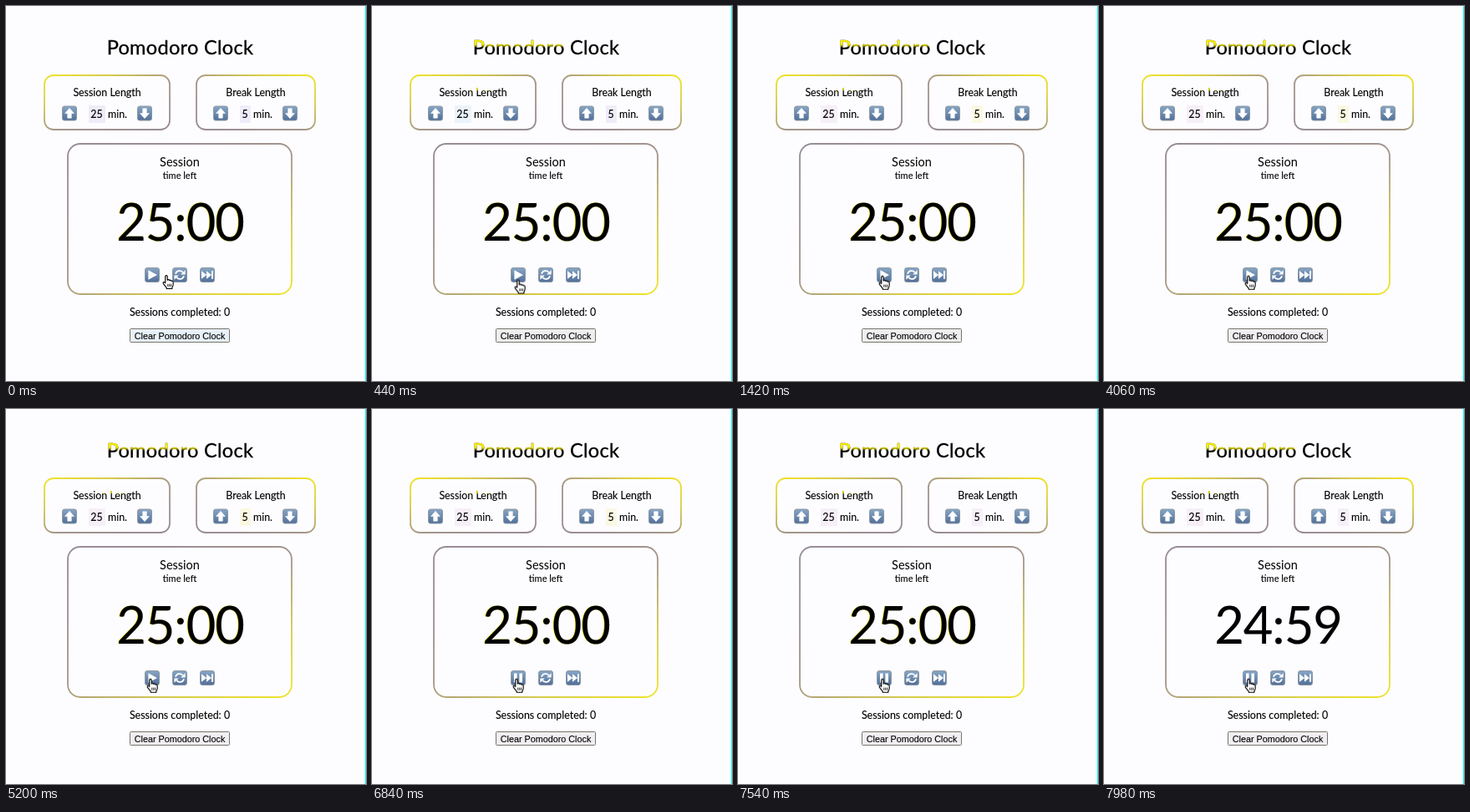
Recreate the animation shown at these times as an HTML page. Size 431x449 px, loop 8000 ms.

```html
<!DOCTYPE html>
<html lang="en">
<head>
<meta charset="utf-8">
<title>Pomodoro Clock</title>
<style>
  html, body { margin: 0; width: 100%; height: 100%; overflow: hidden; background: #fdfdff; }
  svg { display: block; width: 431px; height: 449px; }
  text { font-family: Lato, "Open Sans", sans-serif; font-size: 12.4px; text-anchor: middle; white-space: pre; }
  .ink { stroke: #000; stroke-width: .12; stroke-linejoin: round; }
  .title { font-size: 23.6px; letter-spacing: .28px; }
  .title.ink { stroke-width: .3; }
  .heading { font-size: 14.5px; }
  .small { font-size: 11px; }
  .timer { font-size: 61.5px; letter-spacing: -1.1px; }
  .btn { font: 10.8px "Liberation Sans", Arial, sans-serif; }
  .card { fill: none; stroke-width: 1.8; }
  .glyph { fill: #fff; }
  .arc { fill: none; stroke: #fff; stroke-width: 1.8; }

  .glow, .session, .break, .clear, .before-click, .after-click, .before-tick, .after-tick {
    animation: 8s step-end infinite;
  }
  .glow { animation-name: glow; }
  .session { animation-name: session; }
  .break { animation-name: break; }
  .clear { animation-name: clear; stroke: #77736a; }
  .before-click { animation-name: before-click; }
  .after-click { animation-name: after-click; }
  .before-tick { animation-name: before-tick; }
  .after-tick { animation-name: after-tick; }
  .hand { animation: hand 8s ease-in-out infinite; }

  @keyframes glow { 0% { opacity: 0; } 3%, 100% { opacity: 1; } }
  @keyframes session { 0% { fill: #f0ebf8; } 3% { fill: #ebf3fb; } 12%, 100% { fill: #f7eff8; } }
  @keyframes break { 0% { fill: #f0edfa; } 12% { fill: #fbf8e2; } 90%, 100% { fill: #f6eff8; } }
  @keyframes clear { 0% { fill: #e7f0f8; } 3% { fill: #eeeeef; } 50.75%, 100% { fill: #f1eef1; } }
  @keyframes before-click { 0% { opacity: 1; } 85.5%, 100% { opacity: 0; } }
  @keyframes after-click { 0% { opacity: 0; } 85.5%, 100% { opacity: 1; } }
  @keyframes before-tick { 0% { opacity: 1; } 98%, 100% { opacity: 0; } }
  @keyframes after-tick { 0% { opacity: 0; } 98%, 100% { opacity: 1; } }
  @keyframes hand {
    0%, .25% { transform: translate(187px, 322px); }
    5.5%, 6.75% { transform: translate(170px, 327.5px); }
    17.75%, 100% { transform: translate(168px, 322.7px); }
  }
</style>
</head>
<body>
<svg viewBox="0 0 431 449">
  <defs>
    <linearGradient id="edge" x1=".2" y1="0" x2="1" y2="1">
      <stop offset="0" stop-color="#988b98"/>
      <stop offset=".45" stop-color="#a4968a"/>
      <stop offset=".75" stop-color="#d8cc48"/>
      <stop offset="1" stop-color="#efe42c"/>
    </linearGradient>
    <linearGradient id="edge-left" href="#edge" x1="1" y1="1" x2="0" y2="0"/>
    <linearGradient id="edge-right" href="#edge" x1="0" y1="1" x2="1" y2="0"/>
    <linearGradient id="sun" gradientUnits="userSpaceOnUse" x1="0" y1="46" x2="0" y2="50">
      <stop offset="0" stop-color="#fbf000"/>
      <stop offset="1" stop-color="#fbf000" stop-opacity="0"/>
    </linearGradient>
    <linearGradient id="sun-label" href="#sun" x1="0" y1="100" x2="0" y2="102"/>
    <linearGradient id="key" x2="0" y2="1">
      <stop offset="0" stop-color="#86a5c4"/>
      <stop offset="1" stop-color="#53709a"/>
    </linearGradient>
    <g id="tile">
      <rect x="-9" y="-9" width="18" height="18" rx="3.5" fill="#8b98a3"/>
      <rect x="-8" y="-8" width="16" height="16" rx="2.6" fill="url(#key)"/>
    </g>
    <g id="up">
      <use href="#tile"/>
      <path class="glyph" d="M0-6.4 6 .2H2.6V6H-2.6V.2H-6Z"/>
    </g>
    <g id="down">
      <use href="#tile"/>
      <path class="glyph" d="M0 6.4 6-.2H2.6V-6H-2.6V-.2H-6Z"/>
    </g>
  </defs>

  <rect width="431" height="449" fill="#fdfdff"/>
  <rect x="430" width="1" height="449" fill="#0ff"/>

  <text class="title ink" x="208.5" y="58">Pomodoro Clock</text>
  <g class="glow">
    <text class="title" x="208.5" y="58" fill="url(#sun)" stroke="url(#sun)" stroke-width=".5">Pomodoro<tspan fill="none" stroke="none"> Clock</tspan></text>
  </g>

  <rect class="card" x="46" y="83" width="150" height="65" rx="11" stroke="url(#edge-left)"/>
  <text class="ink" x="121" y="107.6">Session Length</text>
  <g class="glow">
    <text x="121" y="107.6" fill="none">Sessio<tspan fill="url(#sun-label)" stroke="url(#sun-label)" stroke-width=".3">n Len</tspan>gth</text>
  </g>
  <use href="#up" x="76" y="128.5"/>
  <rect class="session" x="99" y="119" width="20" height="21"/>
  <text class="ink" x="108.5" y="133.5">25</text>
  <text class="ink" x="133.5" y="133.5">min.</text>
  <use href="#down" x="166" y="128.5"/>

  <rect class="card" x="228" y="83" width="142" height="65" rx="11" stroke="url(#edge-right)"/>
  <text class="ink" x="299" y="107.6">Break Length</text>
  <use href="#up" x="257" y="128.5"/>
  <rect class="break" x="280" y="119" width="13" height="21"/>
  <text class="ink" x="286" y="133.5">5</text>
  <text class="ink" x="307.5" y="133.5">min.</text>
  <use href="#down" x="340" y="128.5"/>

  <rect class="card" x="74" y="165" width="268" height="180" rx="15" stroke="url(#edge)"/>
  <text class="heading" x="208" y="191.6">Session</text>
  <text class="small ink" x="208" y="207.4">time left</text>

  <g class="before-tick">
    <text class="timer" x="207.8" y="280.8" fill="#eee000">25:00</text>
    <text class="timer ink" x="208.5" y="280.8">25:00</text>
  </g>
  <g class="after-tick">
    <text class="timer ink" x="208.5" y="280.8">24:59</text>
  </g>

  <g transform="translate(175 322)">
    <use href="#tile"/>
    <path class="glyph before-click" d="M-4.6-5.8 6 0-4.6 5.8Z"/>
    <path class="glyph after-click" d="M-5-5.5h3.6v11H-5ZM1.4-5.5H5v11H1.4Z"/>
  </g>
  <g transform="translate(208 322)">
    <use href="#tile"/>
    <path class="arc" d="M-5-1.2A5 5 0 0 1 3.6-3.2M5 1.2A5 5 0 0 1-3.6 3.2"/>
    <path class="glyph" d="M6.6-5.8V-.4H1.2ZM-6.6 5.8V.4H-1.2Z"/>
  </g>
  <g transform="translate(241 322)">
    <use href="#tile"/>
    <path class="glyph" d="M-7-4.8-.8 0-7 4.8ZM-1-4.8 5 0-1 4.8ZM5-4.8h2v9.6H5Z"/>
  </g>

  <text class="ink" x="208" y="370.6">Sessions completed: 0</text>
  <rect class="clear" x="148.5" y="386.5" width="119" height="16" rx="1"/>
  <text class="btn ink" x="208" y="398.8">Clear Pomodoro Clock</text>

  <g class="hand" stroke="#000" stroke-linejoin="round">
    <g transform="scale(.94)">
      <path fill="#fff" stroke-width="1.2" d="M4 1.8C4 .2 6.6 .2 6.6 1.8V6.6C7 5.6 9.2 5.8 9.2 7 9.8 6.2 11.6 6.5 11.6 7.8 12.4 7.2 14 7.6 14 9V12C14 14 13 15 12.6 16.2V17.6H5.6V16.4C4.4 15 3 13.2 1.8 11.6 .2 9.2 2 8.2 4 10.2Z"/>
      <path fill="none" stroke-width=".9" d="M7.2 11.5v3.3M9.2 11.5v3.3M11.2 11.5v3.3"/>
    </g>
  </g>
</svg>
</body>
</html>
```
